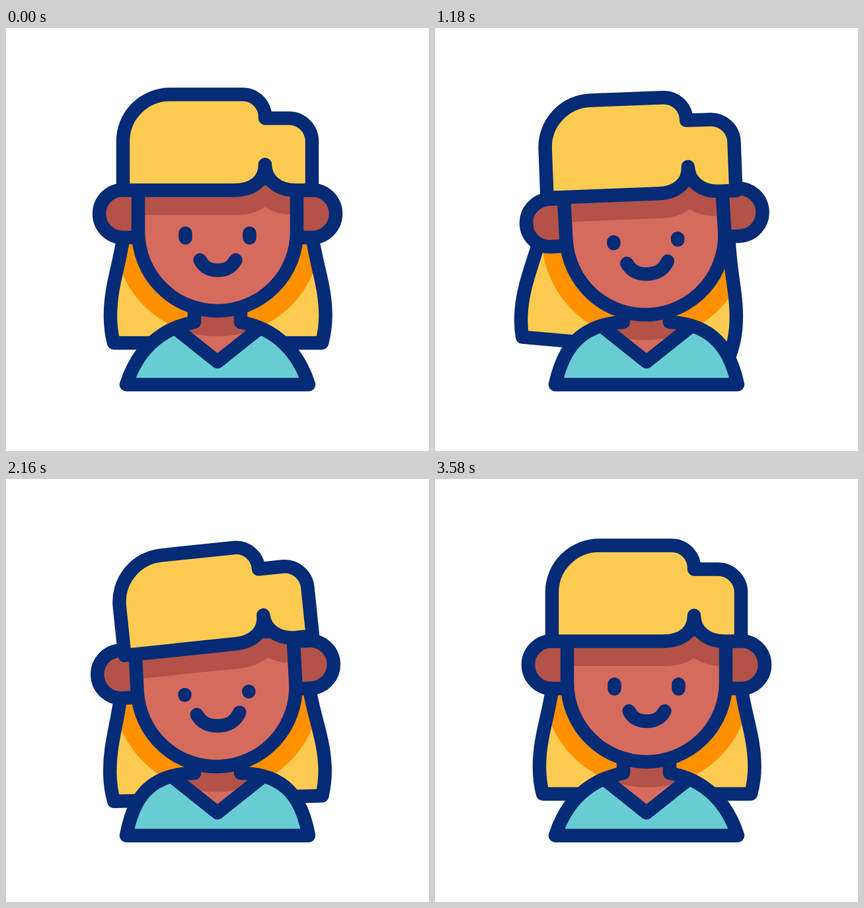
Animation of 640 by 640 pixels, one loop 3.6 s. Source, as an HTML page:

```html
<!DOCTYPE html>
<html lang="en">
<head>
<meta charset="utf-8">
<title>Nodding girl</title>
<style>
  html, body { margin: 0; width: 100%; height: 100%; overflow: hidden; background: #fff; }
  svg { display: block; width: 100vw; height: 100vh; }
  .line { fill: none; stroke: #042b76; stroke-width: 20.5; stroke-linecap: round; stroke-linejoin: round; }
  .hair { fill: #fdcb51; }
  .shade { fill: #ff9100; }
  .skin { fill: #d56b5d; }
  .dark { fill: #b35248; }
  .shirt { fill: #67cdd2; }
</style>
</head>
<body>
<svg viewBox="0 0 640 640">
  <defs>
    <path id="lock" d="M181 290C176 350 158 385 158 435C158 452 160 465 163 476.5H478C481 465 483.500 452 483.500 435C483.500 385 465 350 460 290Z"/>
    <path id="face" d="M200 228V308A120 120 0 0 0 440 308V228Z"/>
    <path id="neck" d="M285 420V445L256 454L320 505L384 454L355 445V420Z"/>
    <path id="cap" d="M177 245.500V171A71 71 0 0 1 248 100.500H358A34 34 0 0 1 392 136.500H428A35 35 0 0 1 463 171.500V245.500H438C412 245.500 392 230 392 206.500C392 230 375 245.500 345 245.500Z"/>
    <path id="ear" d="M205 245H177A36 36 0 0 0 177 317H205"/>
    <clipPath id="lockClip"><use href="#lock" class="sway"/></clipPath>
    <clipPath id="neckClip"><use href="#neck"/></clipPath>
    <clipPath id="faceClip"><use href="#face"/></clipPath>
  </defs>

  <g class="head">
    <use href="#lock" class="hair sway"/>
    <g clip-path="url(#lockClip)"><circle class="shade" cx="320" cy="309.500" r="157"/></g>
    <use href="#lock" class="line sway"/>
  </g>

  <use href="#neck" class="skin"/>
  <g clip-path="url(#neckClip)">
    <g class="head"><circle class="dark" cx="320" cy="309.500" r="157"/></g>
  </g>
  <path id="shirtFill" class="shirt"/>
  <path id="shoulders" class="line"/>
  <path class="line" d="M256 454L320 505L384 454"/>

  <g class="head">
    <g id="ears">
      <use href="#ear" class="dark"/>
      <use href="#ear" class="line"/>
      <g transform="matrix(-1 0 0 1 640 0)">
        <use href="#ear" class="dark"/>
        <use href="#ear" class="line"/>
      </g>
    </g>
    <use href="#face" class="skin"/>
    <g clip-path="url(#faceClip)">
      <path class="dark tilt" d="M120 180V283H350Q374 283 392 271Q410 283 435 283H520V180Z"/>
    </g>
    <use href="#face" class="line"/>
    <path id="eyes" class="line"/>
    <path id="mouth" class="line"/>
    <g class="tilt">
      <use href="#cap" class="hair"/>
      <use href="#cap" class="line"/>
    </g>
  </g>
</svg>
<script>
  const LOOP = 3600;

  // [time in ms, value] pairs, eased in and out between neighbours
  const tracks = {
    turn:  [[0, 0], [460, -9.8], [890, 10], [1290, -6], [1720, 8], [2150, -3], [2690, 0]],
    drop:  [[0, 0], [460, 25], [890, 0], [1290, 7], [1720, 0], [2150, 7], [2690, 0]],
    tilt:  [[0, 0], [560, -8], [975, 7], [1410, -6], [1840, 4], [2260, -4], [2540, 1], [2700, 0]],
    sway:  [[0, 0], [190, 2], [740, -11], [1100, 9.5], [1580, -8], [1960, 6.5], [2380, -4.3], [2740, 0]],
    squint: [[0, 0], [450, 1], [880, .2], [1290, .8], [1720, .2], [2150, .95], [2690, 0]],
    smile: [[0, 0], [450, .7], [880, 1], [1500, .1], [2150, .8], [2690, 0]],
    shrug: [[0, 0], [450, 1], [880, 1], [1500, .5], [2150, 1], [2690, 0]]
  };

  const $ = id => document.getElementById(id);
  const all = name => document.querySelectorAll('.' + name);
  const mix = (a, b, k) => a + (b - a) * k;
  const groups = { head: all('head'), tilt: all('tilt'), sway: all('sway') };

  function at(keys, t) {
    const i = keys.findIndex(k => k[0] > t);
    if (i < 0) return keys[keys.length - 1][1];
    const [t0, v0] = keys[i - 1], [t1, v1] = keys[i];
    return mix(v0, v1, (1 - Math.cos(Math.PI * (t - t0) / (t1 - t0))) / 2);
  }

  function move(name, transform) {
    groups[name].forEach(el => el.setAttribute('transform', transform));
  }

  function shoulderPaths(k) {
    const x1 = mix(197, 192, k), y1 = mix(492, 485, k);
    const x2 = mix(230, 215, k), y2 = mix(455, 446, k);
    const left = `M285 445C${x2} ${y2} ${x1} ${y1} 182 539.5`;
    const right = `H458C${640 - x1} ${y1} ${640 - x2} ${y2} 355 445`;
    return {
      fill: `${left}${right}L384 454L320 505L256 454Z`,
      line: `M285 425L${left.slice(1)}${right}V425`
    };
  }

  function draw(t) {
    const p = {};
    for (const name in tracks) p[name] = at(tracks[name], t);

    move('head', `translate(0 ${p.drop}) rotate(${p.turn} 320 338)`);
    move('tilt', `rotate(${p.tilt} 320 117)`);
    move('sway', `rotate(${p.sway} 320 205)`);

    const body = shoulderPaths(p.shrug);
    $('shirtFill').setAttribute('d', body.fill);
    $('shoulders').setAttribute('d', body.line);

    const top = 310.5 + 6.5 * p.squint;
    $('eyes').setAttribute('d', `M271.5 ${top}V317.5M368.5 ${top}V317.5`);

    const s = 1 + .25 * p.smile, w = 27 * s, y = 366.5 - 15.5 * s;
    const c = 10.5 * s, low = 366.5;
    $('mouth').setAttribute('d',
      `M${320.5 - w} ${y}C${320.5 - w + 5 * s} ${low - 6 * s} ${320.5 - c - 4 * s} ${low} 320.5 ${low}` +
      `S${320.5 + w - 5 * s} ${low - 6 * s} ${320.5 + w} ${y}`);
  }

  const start = performance.now();
  function tick() {
    draw((performance.now() - start) % LOOP);
    requestAnimationFrame(tick);
  }
  tick();
</script>
</body>
</html>
```
